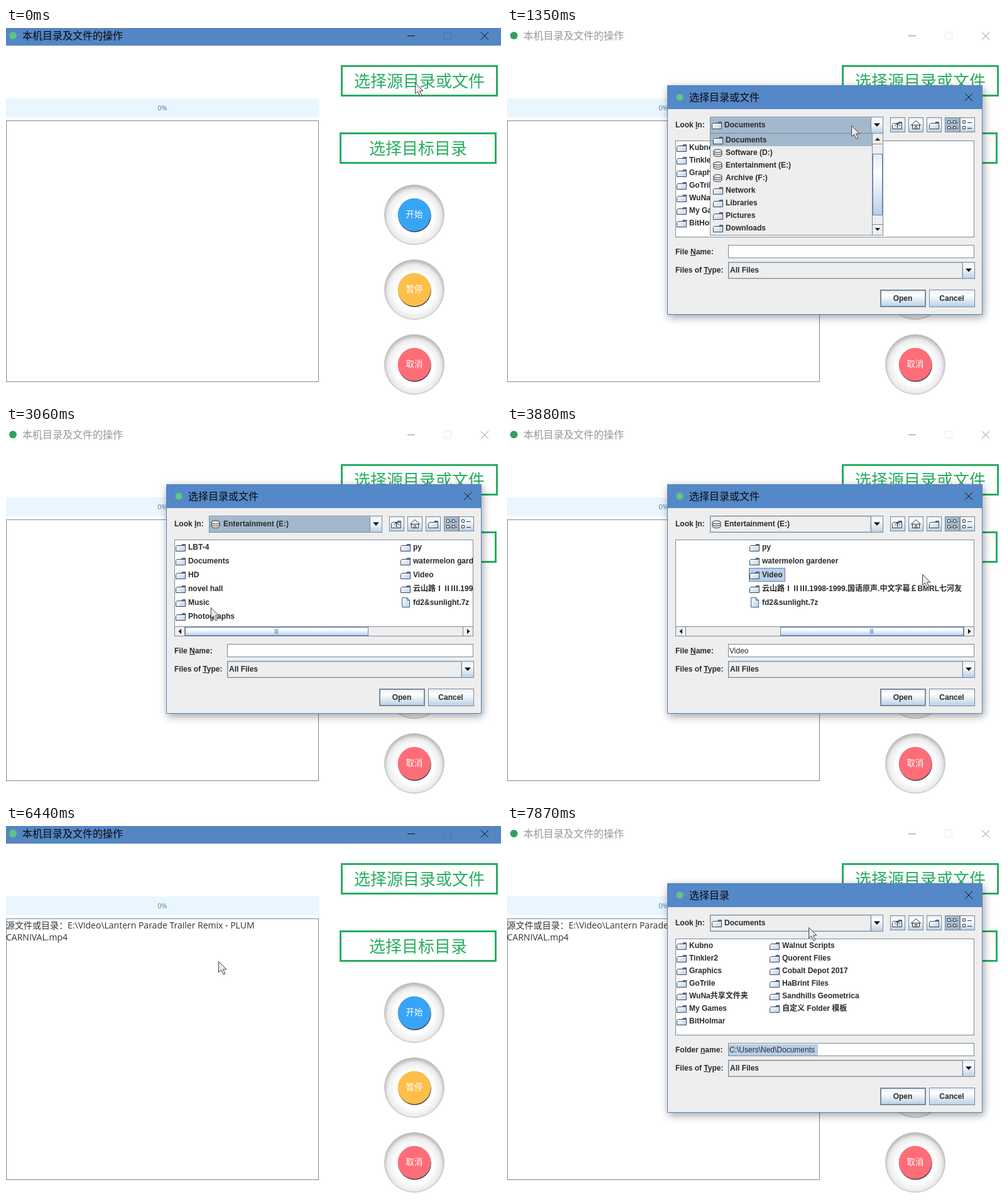
Recreate the animation shown at these times as an HTML page. Size 788x590 px, loop 8 s.

```html
<!DOCTYPE html>
<html lang="zh">
<head>
<meta charset="utf-8">
<title>File chooser</title>
<style>
html, body { margin: 0; width: 100%; height: 100%; overflow: hidden; background: #fff; }
svg { display: block; width: 788px; height: 590px; }
text { font: 16px "Noto Sans CJK SC", "Noto Sans CJK", sans-serif; white-space: pre; }
.big text { font-size: 26px; fill: #27ae60; text-anchor: middle; }
.big rect { fill: #fff; stroke: #27ae60; stroke-width: 3; }
.round text { font-size: 13.4px; fill: #fff; text-anchor: middle; }
.log text { font: 14px "Open Sans", "Noto Sans CJK SC", sans-serif; fill: #333; }
.chooser text { font: bold 12px "Liberation Sans", "Noto Sans CJK SC", sans-serif; fill: #2b2b2b; }
.chooser text.title { font: 16px "Noto Sans CJK SC", "Noto Sans CJK", sans-serif; fill: #0a0a0a; }
.chooser text.plain { font-weight: normal; }
.chooser .mid { text-anchor: middle; }
.u { text-decoration: underline; }
.line { fill: none; stroke: #7a8a99; }
.white { fill: #fff; stroke: #7a8a99; }
.metal { fill: url(#metal); stroke: #7a8a99; }
.pick { fill: #b8cfe5; stroke: #6382bf; }
.glyph { fill: none; stroke: #44546a; }

/* Timeline: 1% = 80 ms */
.t { opacity: 0; animation: 8s step-end infinite; }
.active { animation-name: active; }
.docs { animation-name: docs; }
.fresh { animation-name: fresh; }
.focus { animation-name: focus; }
.popup { animation-name: popup; }
.drive { animation-name: drive; }
.picked { animation-name: picked; }
.video { animation-name: video; }
.opened { animation-name: opened; }
.chosen { animation-name: chosen; }
.fileMode { animation-name: fileMode; }
.saved { animation-name: saved; }
@keyframes active { 0%, 80.5% { opacity: 1 } 5.4%, 90.375% { opacity: 0 } }
@keyframes docs { 0%, 80.5% { opacity: 1 } 25.625% { opacity: 0 } }
@keyframes fresh { 0% { opacity: 1 } 14% { opacity: 0 } }
@keyframes focus { 14% { opacity: 1 } 47.5% { opacity: 0 } }
@keyframes popup { 15.125% { opacity: 1 } 25.625% { opacity: 0 } }
@keyframes drive { 25.625% { opacity: 1 } 64.875% { opacity: 0 } }
@keyframes picked { 47.5% { opacity: 1 } 64.875% { opacity: 0 } }
@keyframes video { 64.875% { opacity: 1 } 80.5% { opacity: 0 } }
@keyframes opened { 64.875% { opacity: 1 } 76.625% { opacity: 0 } }
@keyframes chosen { 76.625% { opacity: 1 } 80.5% { opacity: 0 } }
@keyframes fileMode { 0% { opacity: 1 } 80.5% { opacity: 0 } }
@keyframes saved { 80.5%, 100% { opacity: 1 } }

.scroll { animation: scroll 8s step-end infinite; }
.thumb { animation: thumb 8s step-end infinite; }
.hover { animation: hover 8s step-end infinite; }
@keyframes scroll { 47.5%, 100% { transform: translateX(-242px) } }
@keyframes thumb { 47.5%, 100% { transform: translateX(150px) } }
@keyframes hover { 21.6% { transform: translateY(20px) } 23%, 100% { transform: translateY(40px) } }

.chooser { transform-origin: 506px 274px; animation: chooser 8s ease-out infinite; }
@keyframes chooser {
  0%, 5.9%, 80.5%, 91.25% { opacity: 0; transform: scale(.94) }
  8.75%, 80.499%, 94%, 100% { opacity: 1; transform: none }
}
.shadow { fill: #000; opacity: .38; filter: blur(7px); }

.cursor { animation: cursor 8s ease-in-out infinite; }
@keyframes cursor {
  0%, .8% { transform: translate(651px, 87px) }
  1.375%, 4.4% { transform: translate(651px, 85px) }
  8.25% { transform: translate(531px, 115px) }
  14%, 19% { transform: translate(548px, 155px) }
  23.75%, 25.7% { transform: translate(439px, 216px) }
  35.6%, 36.6% { transform: translate(305px, 290px) }
  46.4%, 48.6% { transform: translate(661px, 234px) }
  57%, 58.1% { transform: translate(424px, 237px) }
  59.1%, 67.8% { transform: translate(421px, 233px) }
  75.5%, 80.6% { transform: translate(338px, 215px) }
  89.4%, 91.3% { transform: translate(600px, 188px) }
  98.3%, 100% { transform: translate(480px, 161px) }
}
</style>
</head>
<body>
<svg viewBox="0 0 788 590">
  <defs>
    <linearGradient id="metal" x2="0" y2="1">
      <stop stop-color="#e3edf6"/><stop offset=".3" stop-color="#fff"/>
      <stop offset=".55" stop-color="#e6eef6"/><stop offset="1" stop-color="#b8cfe5"/>
    </linearGradient>
    <linearGradient id="paper" x2="1" y2="1">
      <stop stop-color="#fff"/><stop offset="1" stop-color="#b8cfe5"/>
    </linearGradient>
    <radialGradient id="dish" cy=".53" r=".53">
      <stop offset=".6" stop-color="#fff"/><stop offset=".84" stop-color="#ececec"/>
      <stop offset="1" stop-color="#b0b0b0"/>
    </radialGradient>
    <clipPath id="listClip"><path d="M269 180h474v152H269z"/></clipPath>
    <g id="folder">
      <path d="M9.5 3.5L10.5 1.5H15.5V3.5Z" fill="#6382bf" stroke="#44546a"/>
      <path d="M.5 12.5V5.5L2 3.5H15.5V12.5Z" fill="url(#paper)" stroke="#3f4b5b"/>
    </g>
    <g id="file">
      <path d="M.5 .5H8.5L12.5 4.5V15.5H.5Z" fill="url(#paper)" stroke="#35618f"/>
      <path d="M8.5 .5V4.5H12.5" fill="none" stroke="#35618f"/>
    </g>
    <g id="disk" fill="#eee" stroke="#333">
      <path d="M1 3.5V10C1 13.3 14 13.3 14 10V3.5"/>
      <ellipse cx="7.5" cy="3.5" rx="6.5" ry="2.5"/>
      <path d="M1 7C1 10 14 10 14 7" fill="none"/>
    </g>
    <g id="controls" fill="none">
      <path d="M639 12.5H651M756 6.500L768 18.500M768 6.500L756 18.500"/>
    </g>
    <path id="down" d="M-5 -2.500H5L0 3Z" fill="#111"/>
  </defs>

  <!-- Main window -->
  <rect width="788" height="590" fill="#fff"/>
  <circle cx="11" cy="12" r="6" fill="#2fa05f"/>
  <text x="26" y="18.300" fill="#98988f">本机目录及文件的操作</text>
  <use href="#controls" stroke="#8c8c8c"/>
  <path d="M697.500 6.500h11v11h-11z" fill="none" stroke="#eaeaea"/>
  <g class="t active">
    <rect width="788" height="28" fill="#5486c4"/>
    <circle cx="11" cy="12" r="6" fill="#5cc487"/>
    <text x="26" y="18.300" fill="#0a0a0a">本机目录及文件的操作</text>
    <use href="#controls" stroke="#0a0a0a"/>
    <path d="M697.500 6.500h11v11h-11z" fill="none" stroke="#4974ad"/>
  </g>
  <rect y="112" width="499" height="30" fill="#eaf6fe"/>
  <text x="249" y="131" fill="#4880ae" text-anchor="middle" style="font:11px 'Open Sans',sans-serif">0%</text>
  <rect class="white" x=".5" y="147.500" width="497" height="415"/>
  <g class="t saved log">
    <text x="0" y="163">源文件或目录：E:\Video\Lantern Parade Trailer Remix - PLUM</text>
    <text x="0" y="182">CARNIVAL.mp4</text>
  </g>
  <g class="big">
    <rect x="534.500" y="60.500" width="247" height="47"/><text x="658" y="94">选择源目录或文件</text>
    <rect x="532.500" y="167.500" width="247" height="47"/><text x="656" y="201">选择目标目录</text>
  </g>
  <g class="round" id="round"></g>

  <!-- File chooser -->
  <g class="chooser">
    <rect class="shadow" x="257" y="95" width="502" height="365"/>
    <rect x="255.500" y="91.500" width="501" height="364" fill="#eee" stroke="#5284c0"/>
    <path d="M256 92h500v37H256z" fill="#5488c8"/>
    <circle cx="275" cy="110" r="5.500" fill="#62c583"/>
    <text class="title t fileMode" x="290" y="116">选择目录或文件</text>
    <text class="title t saved" x="290" y="116">选择目录</text>
    <path d="M729 104L741 116M741 104L729 116" stroke="#111"/>

    <text x="268" y="158">Look <tspan class="u">I</tspan>n:</text>
    <rect class="line" x="323.500" y="141.500" width="275" height="26"/>
    <rect class="line" x="324.500" y="142.500" width="254" height="24" style="stroke:#b8cfe5"/>
    <rect class="t focus" x="324" y="143" width="255" height="24" fill="#a3b8cc"/>
    <rect class="metal" x="579.500" y="141.500" width="19" height="26"/>
    <use href="#down" x="589" y="154"/>
    <g id="tools"></g>
    <g class="glyph">
      <use href="#folder" x="613" y="148"/><path d="M617.500 155.500L621.500 151.500L625.500 155.500M621.500 152V159" stroke="#222"/>
      <path d="M643.500 154.500L651 147.500L658.500 154.500ZM645.500 154.500V160.500H656.500V154.500M649.500 160V156.500H652.500V160" fill="#f4f8fc" stroke="#333"/>
      <use href="#folder" x="672" y="148"/>
      <path d="M701.500 147.500h4v4h-4zM701.500 156.500h4v4h-4zM710.500 147.500h4v4h-4zM710.500 156.500h4v4h-4zM707 150.500h2M707 159.500h2M716 150.500h2M716 159.500h2" fill="#fff" stroke="#333"/>
      <path d="M725.500 147.500h4v4h-4zM725.500 156.500h4v4h-4zM733 150.500h7M733 159.500h7" fill="#fff" stroke="#333"/>
    </g>

    <rect class="white" x="268.500" y="179.500" width="475" height="153"/>
    <g class="t docs">
      <use href="#folder" x="326" y="148"/><text x="346" y="158">Documents</text>
      <g id="docsList"></g>
    </g>
    <g class="t drive">
      <use href="#disk" x="326" y="148"/><text x="346" y="158">Entertainment (E:)</text>
      <g clip-path="url(#listClip)">
        <g class="scroll">
          <rect class="pick t picked" x="627.500" y="224.500" width="57" height="21"/>
          <g id="driveList"></g>
        </g>
      </g>
      <rect x="269" y="318" width="474" height="14" fill="#eee"/>
      <path class="line" d="M269 317.500H743M284.500 318V332M727.500 318V332"/>
      <g class="thumb">
        <rect x="285.500" y="318.500" width="291" height="13" fill="url(#metal)" stroke="#6382bf"/>
        <path d="M428.500 321V329M430.500 321V329M432.500 321V329" stroke="#6382bf"/>
      </g>
      <path d="M279 321V329L274.500 325ZM734 321V329L738.500 325Z" fill="#111"/>
    </g>
    <g class="t video">
      <use href="#folder" x="326" y="148"/><text x="346" y="158">Video</text>
      <rect class="t opened" x="269.500" y="180.500" width="40" height="21" fill="none" stroke="#6382bf"/>
      <rect class="pick t chosen" x="269.500" y="202.500" width="324" height="21"/>
      <g id="videoList"></g>
    </g>

    <text class="t fileMode" x="268" y="360">File <tspan class="u">N</tspan>ame:</text>
    <text class="t saved" x="268" y="360">Folder <tspan class="u">n</tspan>ame:</text>
    <rect class="white" x="352.500" y="345.500" width="391" height="20"/>
    <path class="t fresh" d="M354.500 347V364" stroke="#222"/>
    <text class="plain t picked" x="354" y="360">Video</text>
    <text class="plain t opened" x="354" y="360">E:\Video</text>
    <text class="plain t chosen" x="354" y="360">Lantern Parade Trailer Remix - PLUM CARNIVAL.mp4</text>
    <g class="t saved">
      <rect x="353" y="347" width="142" height="18" fill="#b8cfe5"/>
      <text class="plain" x="354" y="360">C:\Users\Ned\Documents</text>
    </g>

    <text x="268" y="389">Files of <tspan class="u">T</tspan>ype:</text>
    <rect class="line" x="352.500" y="372.500" width="392" height="26"/>
    <rect class="line" x="353.500" y="373.500" width="371" height="24" style="stroke:#b8cfe5"/>
    <text x="355" y="389">All Files</text>
    <rect class="metal" x="725.500" y="372.500" width="19" height="26"/>
    <use href="#down" x="735" y="385"/>

    <rect class="metal" x="595" y="417" width="71" height="26" stroke-width="2"/>
    <text class="mid" x="630" y="434">Open</text>
    <rect class="metal" x="672.500" y="416.500" width="72" height="27"/>
    <text class="mid" x="708" y="434">Cancel</text>

    <g class="t popup">
      <rect x="323.500" y="167.500" width="275" height="162" fill="#eee" stroke="#7a8a99"/>
      <rect class="hover" x="324" y="168" width="257" height="20" fill="#a3b8cc"/>
      <g id="popupList"></g>
      <path class="line" d="M581.500 168V329M582 184.500H598M582 312.500H598"/>
      <rect x="582.500" y="200.500" width="15" height="97" fill="url(#metal)" stroke="#6382bf"/>
      <path d="M586 179H594L590 174.500ZM586 318H594L590 322.500Z" fill="#111"/>
    </g>
  </g>

  <path class="cursor" d="M.5 .5V17.500L4.500 14L8 21.300L11 20L7.700 13H13Z" fill="#e9e9e9" stroke="#444"/>
</svg>
<script>
const put = (id, markup) => document.getElementById(id).insertAdjacentHTML("beforeend", markup);

// Each row is an icon followed by its label; y is the first baseline.
function addRows(id, icon, names, x, y, step) {
  const lift = icon === "file" ? 12 : 10;
  const inset = icon === "file" ? 2 : 0;
  put(id, names.map((name, i) =>
    `<use href="#${icon}" x="${x + inset}" y="${y + i * step - lift}"/>
     <text x="${x + 20}" y="${y + i * step}">${name}</text>`).join(""));
}

addRows("docsList", "folder",
  ["Kubno", "Tinkler2", "Graphics", "GoTrile", "WuNa共享文件夹", "My Games", "BitHolmar"], 270, 194, 20);
addRows("docsList", "folder",
  ["Walnut Scripts", "Quorent Files", "Cobalt Depot 2017", "HaBrint Files", "Sandhills Geometrica", "自定义 Folder 模板"], 418, 194, 20);

addRows("driveList", "folder",
  ["LBT-4", "Documents", "HD", "novel hall", "Music", "Photographs"], 270, 195, 22);
addRows("driveList", "folder",
  ["py", "watermelon gardener", "Video", "云山路ⅠⅡⅢ.1998-1999.国语原声.中文字幕￡BMRL七河友"], 628, 195, 22);
addRows("driveList", "file", ["fd2&amp;sunlight.7z"], 628, 283, 22);

addRows("videoList", "folder", ["KB"], 270, 195, 22);
addRows("videoList", "file",
  ["Lantern Parade Trailer Remix - PLUM CARNIVAL.mp4", "Drifting Field Illustrations.mp4", "MICRO-FAMILY-RACE! - PLUM CARNIVAL.mp4"], 270, 217, 22);

addRows("popupList", "folder", ["Documents"], 328, 182, 20);
addRows("popupList", "disk", ["Software (D:)", "Entertainment (E:)", "Archive (F:)"], 328, 202, 20);
addRows("popupList", "folder", ["Network", "Libraries", "Pictures", "Downloads"], 328, 262, 20);

put("tools", [610, 639, 668, 697, 721].map(x =>
  `<rect class="metal" x="${x + .5}" y="142.5" width="23" height="23"
    ${x === 697 ? 'style="fill:#a3b8cc"' : ""}/>`).join(""));

put("round", [["开始", "#38a4f6"], ["暂停", "#fdbf4a"], ["取消", "#fd6d78"]].map(([label, color], i) => {
  const y = 297 + i * 119;
  return `<circle cx="650" cy="${y}" r="47.5" fill="url(#dish)" stroke="#c4c4c4"/>
    <circle cx="650.5" cy="${y + 1.5}" r="26.3" fill="#3d4248"/>
    <circle cx="650" cy="${y}" r="26.3" fill="${color}"/>
    <text x="650" y="${y + 4}">${label}</text>`;
}).join(""));
</script>
</body>
</html>
```
